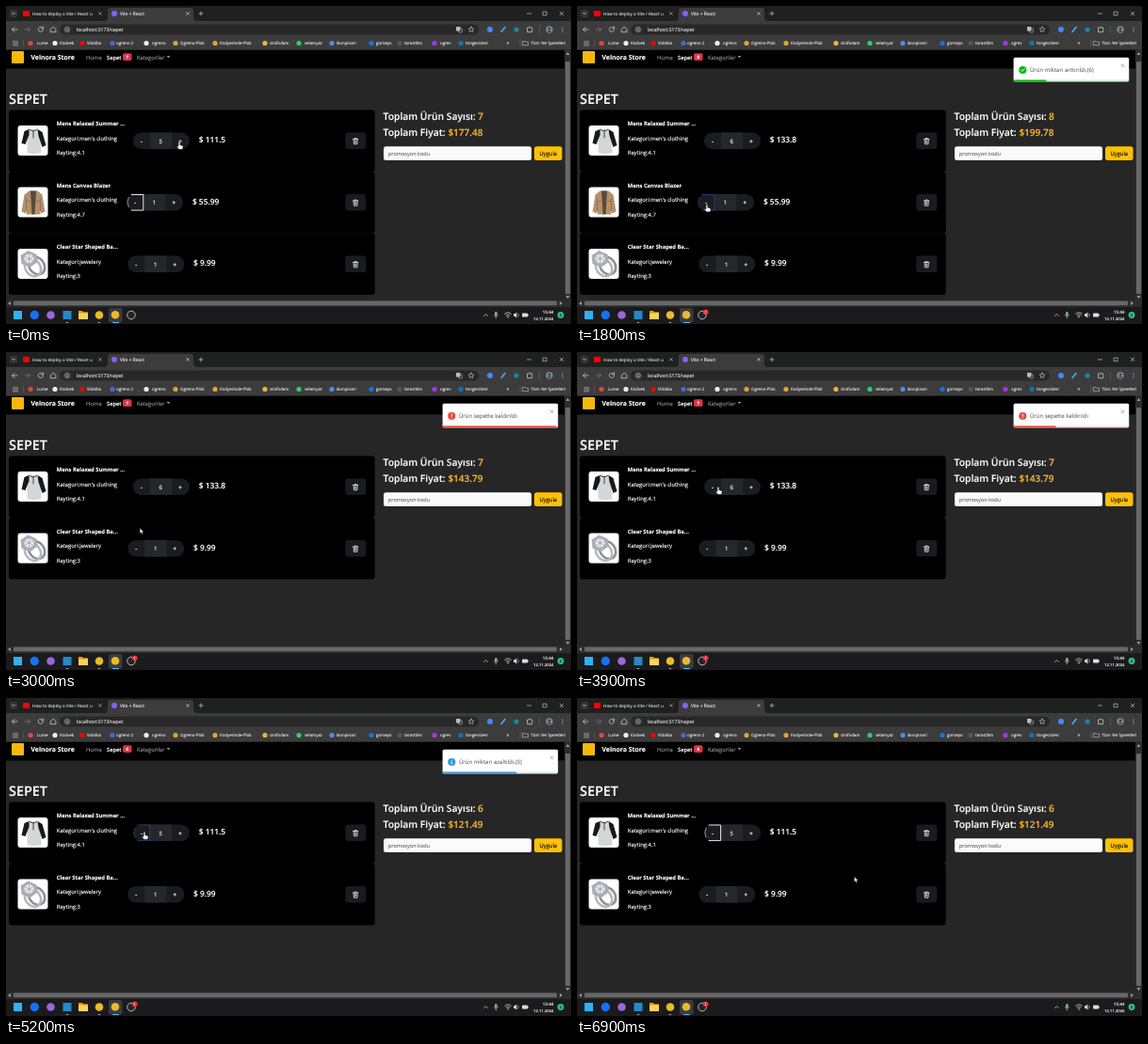
These frames come from a looping animation (600 px wide and 338 px high, 7.1 s). An HTML page:

```html
<!DOCTYPE html>
<html lang="tr">
<head>
<meta charset="utf-8">
<style>
html, body { margin: 0; height: 100%; overflow: hidden; background: #262627; }
svg { display: block; width: 100vw; height: 100vh; }
text { font-family: "Open Sans", "Noto Sans", sans-serif; text-rendering: geometricPrecision; white-space: pre; stroke-width: .14px; }
</style>
</head>
<body>
<svg id="stage" viewBox="0 0 600 338"><g id="back"></g><g id="live"></g></svg>
<script>
const LOOP = 7100, STEP = 100, ENTER = 600, SHOW = 1450, PITCH = 65.5;

const rect = (x, y, w, h, fill, r = 0, more = '') =>
  `<rect x="${x}" y="${y}" width="${w}" height="${h}" fill="${fill}" rx="${r}" ${more}/>`;
const dot = (x, y, r, fill, more = '') => `<circle cx="${x}" cy="${y}" r="${r}" fill="${fill}" ${more}/>`;
const line = (d, color = '#c8c8c8', w = .8) =>
  `<path d="${d}" fill="none" stroke="${color}" stroke-width="${w}" stroke-linecap="round" stroke-linejoin="round"/>`;
const shape = (d, fill, more = '') => `<path d="${d}" fill="${fill}" ${more}/>`;
const text = (x, y, s, size, fill = '#fff', weight = 400, anchor = 'start') =>
  `<text x="${x}" y="${y}" font-size="${size}" fill="${fill}" stroke="${fill}" font-weight="${weight}" text-anchor="${anchor}">${s}</text>`;
const move = (x, y, body, opacity = 1) => `<g transform="translate(${x} ${y})" opacity="${opacity}">${body}</g>`;
const cross = (x, y, r, color, w) =>
  line(`M${x - r} ${y - r}l${2 * r} ${2 * r}m0 ${-2 * r}l${-2 * r} ${2 * r}`, color, w);

function browser() {
  const marks = [
    [26, 33, 'Lume', '#ea4335'], [52, 57, 'Kodvek', '#f0f0f0'], [81, 86, 'Vidolka', '#f00'],
    [113, 117, 'ogreno 2', '#4a66d8'], [149, 155, 'ogreno', '#eee'], [180, 185, 'Ogreno-Plok', '#e0a62c'],
    [222, 227, 'Kodyerinde-Plok', '#e0a62c'], [275, 280, 'sinifodam', '#e8b731'],
    [311, 317, 'selamyaz', '#25d366'], [346, 351, 'ikonpinari', '#4c8bf5'], [388, 393, 'gorsepo', '#1273eb'],
    [418, 423, 'tarastilim', '#555'], [455, 461, 'ogrev', '#a435f0'], [483, 488, 'tongecisleri', '#1273b8']
  ];
  return rect(0, 0, 600, 16, '#1f2020') + rect(4, 4, 8, 8, '#343536', 2) + line('M6.7 7.3l1.3 1.4 1.3-1.4')
    + rect(18, 5, 7, 6, '#f00', 1) + text(28, 9.8, 'How to deploy a Vite / React u', 4.6, '#d0d0d0')
    + cross(100, 8, 1.4, '#bbb', .6)
    + shape('M104 16q4 0 4-4V5q0-3 3-3h85q3 0 3 3v7q0 4 4 4z', '#3c3c3c')
    + dot(115, 8, 3, '#8d5cff') + text(121, 9.8, 'Vite + React', 4.8, '#eee')
    + cross(193, 8, 1.4, '#ddd', .6) + line('M205 8h4m-2-2v4', '#ccc', .7)
    + line('M553.5 8h4', '#ddd', .6) + line('M570.5 6.2h3.6v3.6h-3.6z', '#ddd', .6) + cross(590, 8, 1.8, '#ddd', .6)
    // toolbar
    + rect(0, 16, 600, 30.5, '#3c3c3c') + rect(57, 19.5, 445, 11, '#282828', 5.5)
    + line('M12 25H6.5m2.5-2.5L6.5 25l2.5 2.5') + line('M20 25h5.5M23 22.5l2.5 2.5-2.5 2.5', '#777')
    + line('M39.5 25a2.6 2.6 0 1 1-.8-2m.9-1v2h-2') + line('M47.5 24.5l2.7-2.3 2.7 2.3v3.2h-5.4z')
    + dot(65, 25, 4.2, '#3c3c3c') + dot(65, 25, 2.2, 'none', 'stroke="#ccc" stroke-width=".6"') + line('M65 24.8v1', '#ccc', .6)
    + text(75, 26.8, 'localhost:5173/sepet', 5.1, '#e3e3e3')
    + rect(478, 22, 4.5, 4.5, '#bbb', .6) + rect(480.5, 24, 4, 4, 'none', .6, 'stroke="#bbb" stroke-width=".6"')
    + line('M494 22l.9 1.9 2.1.2-1.6 1.4.5 2-1.9-1-1.9 1 .5-2-1.6-1.4 2.1-.2z', '#ccc', .6)
    + dot(514, 25, 3, '#3d8bfd') + line('M526 27.5l4-5', '#58a6ff', 1.6) + dot(542, 25, 2.6, '#138a9e')
    + line('M554 23h1.3q.9-2 1.8 0h1.4v1.5q1.8.8 0 1.6v1.6H554z', '#ccc', .8) + line('M566.5 21v8', '#666', .6)
    + dot(577, 25, 3.7, '#7d8791') + dot(577, 24, 1.3, '#353a3d') + shape('M574.5 27.5q2.5-3.4 5 0z', '#353a3d')
    + [23, 25, 27].map(y => dot(591, y, .55, '#ccc')).join('')
    // bookmarks
    + [0, 1, 2].map(i => [0, 1, 2].map(j => rect(7.5 + i * 2, 37.2 + j * 2, 1.2, 1.2, '#bbb')).join('')).join('')
    + line('M18.5 36.5v6', '#666', .5)
    + marks.map(([ix, x, s, c]) => dot(ix, 39.5, 2.6, c) + text(x, 41.2, s, 4.4, '#dedede')).join('')
    + text(531.5, 41.2, '»', 5.5, '#ddd') + line('M546 36.5v6', '#777', .5)
    + line('M549 37.5h2l.7.8h2.8v3.4H549z', '#ccc', .6) + text(557.5, 41.2, 'Tüm Yer İşaretleri', 4.5, '#dedede');
}

function page() {
  return rect(0, 46.5, 593, 20, '#000') + rect(6, 48, 13, 13, '#f7b80c', 1)
    + text(26.5, 57.2, 'Velnora Store', 6.9, '#fff', 700)
    + text(85, 56.5, 'Home', 5.9, '#8f8f8f') + text(107, 56.5, 'Sepet', 5.7, '#fff', 600)
    + text(139, 56.5, 'Kategoriler', 5.8, '#8f8f8f') + shape('M170.5 53h4l-2 2.2z', '#8f8f8f')
    + text(3, 104, 'SEPET', 14.4, '#fff', 600)
    + text(400.5, 121.3, 'Toplam Ürün Sayısı:', 10.35, '#fff', 600)
    + text(400.5, 137.5, 'Toplam Fiyat:', 10.35, '#fff', 600)
    + rect(401, 149.3, 157, 14.7, '#fafafa', 2.5) + text(405.8, 159, 'promosyon kodu', 5.6, '#6d7174')
    + rect(561, 149.3, 29.5, 14.7, '#ffc107', 2.5) + text(575.8, 158.8, 'Uygula', 5.8, '#111', 400, 'middle')
    + rect(593, 46.5, 7, 266, '#2c2c2c') + rect(594, 59, 5, 247, '#686868', 1)
    + shape('M594.5 52h4l-2-3zM594.5 308h4l-2 3z', '#999')
    + rect(0, 312.5, 600, 7.5, '#2c2c2c') + rect(8, 313.5, 577, 4.8, '#686868', 1)
    + shape('M5 314v4l-3-2zM588 314v4l3-2z', '#999');
}

function taskbar() {
  return rect(0, 320, 600, 18, '#1b1b1e') + rect(8, 324, 9, 9, '#2fb2f0') + dot(30.3, 328.5, 4.7, '#1672f3')
    + dot(47.5, 328.5, 4.3, '#9a68d8') + rect(60.5, 324, 9, 9, '#2489ca')
    + shape('M77 324h4l1 1.3h5V333H77z', '#e3a008') + rect(77, 326.6, 10, 6.4, '#ffd25c', .6)
    + dot(99, 328.5, 4.3, '#e9bb2c') + rect(109, 321, 14.5, 15.5, '#3b3b3f', 2) + dot(116, 328.3, 4.3, '#e9bb2c')
    + rect(113, 336, 7, 1, '#4cc2ff', .5) + [65, 99].map(x => rect(x - 1.5, 336, 3, .9, '#999', .4)).join('')
    + dot(133, 328.5, 4.3, '#242326', 'stroke="#ddd" stroke-width=".8"')
    + line('M507.5 329.5l2-2 2 2', '#ddd', .7)
    + rect(519, 325, 2.6, 4.5, '#6fc276', 1.3) + line('M518 328.5q2.3 4 4.6 0m-2.3 2v1.5', '#ddd', .5)
    + line('M529.7 327.2q3.3-3 6.6 0m-5.2 1.6q1.9-1.8 3.8 0', '#ddd', .8) + dot(533, 330.6, .8, '#ddd')
    + shape('M539 327.3h1.3l2-1.8v6l-2-1.8H539z', '#ddd') + line('M543.8 327q1.3 1.5 0 3', '#ddd', .6)
    + rect(548, 326.5, 6, 4, '#ddd', .8) + rect(554.2, 327.6, .8, 1.8, '#ddd')
    + text(581.5, 326.8, '15:44', 4.6, '#fff', 400, 'end') + text(581.5, 333.6, '12.11.2024', 4.2, '#fff', 400, 'end')
    + dot(589, 328.5, 3.4, '#2dc57c') + text(589, 330, '2', 4.2, '#111', 400, 'middle');
}

const shirt = shape('M11 4h10l3 8 1 17q-8 2-15 0V12z', '#d5d6d9') + shape('M12 4L7 6 4 19l4 1 4-10zM21 4l5 3 4 14-4 2-4-12z', '#17181b')
  + line('M12.5 4q4 4 8 0M16.5 6v7', '#333', .9);
const jacket = shape('M12 4h9l5 4 3 18-4 2-1-3v4H9v-4l-1 3-4-2L7 8z', '#b3916b')
  + shape('M13.5 4h6l-1.5 25h-3z', '#594a3c') + line('M9 12v13M24 12v13M10 15h3M20 15h3', '#846a4c', .8);
const band = (x, y, color) =>
  `<ellipse cx="${x}" cy="${y}" rx="8" ry="10" fill="none" stroke="${color}" stroke-width="2.6" transform="rotate(-35 ${x} ${y})"/>`;
const jewel = band(20, 18, '#8d9198') + band(16, 20, '#b4b8be')
  + shape('M3 7l8-5 9 4 1 8-8 6-9-4z', '#a9aeb5') + shape('M7 8l5-3 5 3v5l-5 3-5-3z', '#e6e9ed')
  + line('M7 8l10 5M17 8L7 13M12 5v11', '#80868e', .5);

const goods = {
  shirt: { name: 'Mens Relaxed Summer ...', kind: "men's clothing", rate: 4.1, x: 135, cost: 22.3, pic: shirt },
  jacket: { name: 'Mens Canvas Blazer', kind: "men's clothing", rate: 4.7, x: 128.2, cost: 55.99, pic: jacket },
  ring: { name: 'Clear Star Shaped Ba...', kind: 'jewelery', rate: 3, x: 129.3, cost: 9.99, pic: jewel }
};

function card(id, row, count, edge) {
  const { name, kind, rate, x, cost, pic } = goods[id];
  const mid = x + 18;
  return move(0, row * PITCH, rect(3, 110.5, 388.7, PITCH, '#000', 3)
    + rect(12.5, 127, 32, 32, '#fff', 3) + move(12.5, 127, pic)
    + text(53.8, 127, name, 5.8, '#fff', 700) + text(53.8, 142.7, 'Kategori:' + kind, 5.9)
    + text(53.8, 158.2, 'Reyting:' + rate, 5.9)
    + rect(x, 134.5, 60, 17.5, '#1a1d20', 8.7) + rect(mid, 134.5, 23, 17.5, '#24282c')
    + (edge ? line(`M${x + 5} 135h12.6v16.6h-12.6`, edge, .9) + line(`M${x + 2} 138q-2.5 5 0 10`, edge, .5) : '')
    + text(x + 9, 145.5, '-', 6, '#fff', 600, 'middle') + text(x + 29.3, 145.6, count, 6, '#fff', 400, 'middle')
    + text(x + 50, 145.6, '+', 6, '#fff', 600, 'middle')
    + text(x + 69.7, 145.4, '$ ' + +(cost * count).toFixed(2), 8.4, '#fff', 600)
    + rect(360.3, 134.5, 22, 17.5, '#191c1f', 3)
    + line('M368.5 141.5h5.4m-3.6 0v-1h1.8v1m-3 0l.3 5.3h3.6l.3-5.3m-2.7 1.4v2.5m1.2-2.5v2.5', '#fff', .7));
}

const toasts = [
  { at: 160, label: 'Ürün miktarı arttırıldı.(6)', color: '#07bc0c', mark: 'M-1.7 0l1.2 1.4L1.9-1.3' },
  { at: 2380, label: 'Ürün sepette kaldırıldı', color: '#e74c3c', mark: 'M0-2v2.2M0 1.9v.1' },
  { at: 4078, label: 'Ürün miktarı azaltıldı.(5)', color: '#3498db', mark: 'M0-1.9v.1M0-.2V2' }
];
const clamp = v => Math.max(0, Math.min(1, v));
const easeOut = v => 1 - (1 - v) ** 3;

// keys: [time, value, ...]; interpolates every value
function tween(keys, t, ease) {
  const i = keys.findIndex(k => k[0] > t);
  if (i < 0) return keys.at(-1).slice(1);
  if (!i) return keys[0].slice(1);
  const a = keys[i - 1], b = keys[i], p = ease((t - a[0]) / (b[0] - a[0]));
  return a.slice(1).map((v, n) => v + (b[n + 1] - v) * p);
}
const bounceIn = [[0, 810], [.6, -6.7], [.75, 2.7], [.9, -1.3], [1, 0]];
const bounceOut = [[0, 0], [.2, -5.4], [1, 540]];

function toast({ at, label, color, mark }, i, t) {
  const age = t - at, out = (age - ENTER - SHOW) / ENTER;
  if (age < 0 || out >= 1) return '';
  const dx = out > 0 ? tween(bounceOut, out, out < .2 ? easeOut : v => v)[0] : tween(bounceIn, age / ENTER, easeOut)[0];
  const left = clamp(1 - (age - ENTER) / SHOW);
  const before = i ? toasts[i - 1].at + ENTER + SHOW + 450 : -999;
  const dy = 31.5 * (1 - easeOut(clamp((t - before) / 250)));
  const alpha = out > .2 ? clamp(1 - (out - .2) / .8) : clamp(age / ENTER / .6);
  return move(463.6 + dx, 54.8 + dy,
    rect(0, 0, 122.6, 25.6, '#fff', 1.6)
    + rect(0, 23.7, 122.6, 1.9, color, .5, 'opacity=".2"') + rect(0, 23.7, 122.6 * left, 1.9, color, .5)
    + dot(9.7, 13.2, 4.1, color) + move(9.7, 13.2, line(mark, '#fff', .9))
    + text(17.4, 15.4, label, 6, '#757575') + cross(115.9, 8.6, 1.5, '#888', .7), alpha);
}

const path = [[0, 184, 144.5], [600, 184, 144.5], [1400, 138, 211], [2600, 138, 211], [3600, 150, 143.5],
  [3900, 150, 143.5], [4100, 147, 142.5], [5600, 147, 142.5], [6300, 294.5, 190]];
const smooth = v => v * v * (3 - 2 * v);
const hand = shape('M-.9.2q.9-.9 1.7 0v3l2.5.7q.8.3.7 1.2l-.5 2.7H-.5L-2.6 5q.1-1.1 1.7-.1z', '#fff', 'stroke="#222" stroke-width=".5"');
const arrow = shape('M0 0v5.6l1.3-1.1.9 2 .9-.4-.9-2H4z', '#fff', 'stroke="#222" stroke-width=".4"');

function cursor(t) {
  const pointing = t <= 700 || t >= 1300 && t <= 2700 || t >= 3500 && t <= 5700;
  return move(...tween(path, t, smooth), pointing ? hand : arrow);
}

function live(t) {
  const cart = [['shirt', t >= 100 && t < 4100 ? 6 : 5]];
  if (t < 2400) cart.push(['jacket', 1]);
  cart.push(['ring', 1]);
  const count = cart.reduce((n, c) => n + c[1], 0);
  const total = cart.reduce((n, [id, c]) => n + goods[id].cost * c, 0).toFixed(2);
  const edges = [
    t >= 6900 ? '#fff' : t >= 4000 && t <= 5700 ? '#353b82' : '',
    t < 100 ? '#fff' : t >= 1400 && t < 2400 ? '#353b82' : t >= 2400 && t <= 2700 ? '#3a3e46' : ''
  ];
  return cart.map(([id, c], i) => card(id, i, c, edges[i])).join('')
    + rect(124, 50.3, 9.5, 7.8, '#dc3545', 1.8) + text(128.8, 56, count, 4.6, '#fff', 700, 'middle')
    + text(501, 121.3, count, 10.3, '#ffb72b', 600) + text(469.4, 137.5, '$' + total, 10, '#ffb72b', 600)
    + (t >= 100 ? dot(136.7, 325.3, 2.9, '#e0333c') + text(136.7, 326.8, '1', 4, '#fff', 400, 'middle') : '')
    + toasts.map((item, i) => toast(item, i, t)).join('') + cursor(t);
}

const back = document.getElementById('back'), front = document.getElementById('live');
back.innerHTML = page() + browser() + taskbar();
const start = performance.now();
let shown = -1;
function tick() {
  const t = Math.floor((performance.now() - start) % LOOP / STEP) * STEP;
  if (t !== shown) front.innerHTML = live(shown = t);
  requestAnimationFrame(tick);
}
tick();
</script>
</body>
</html>
```
